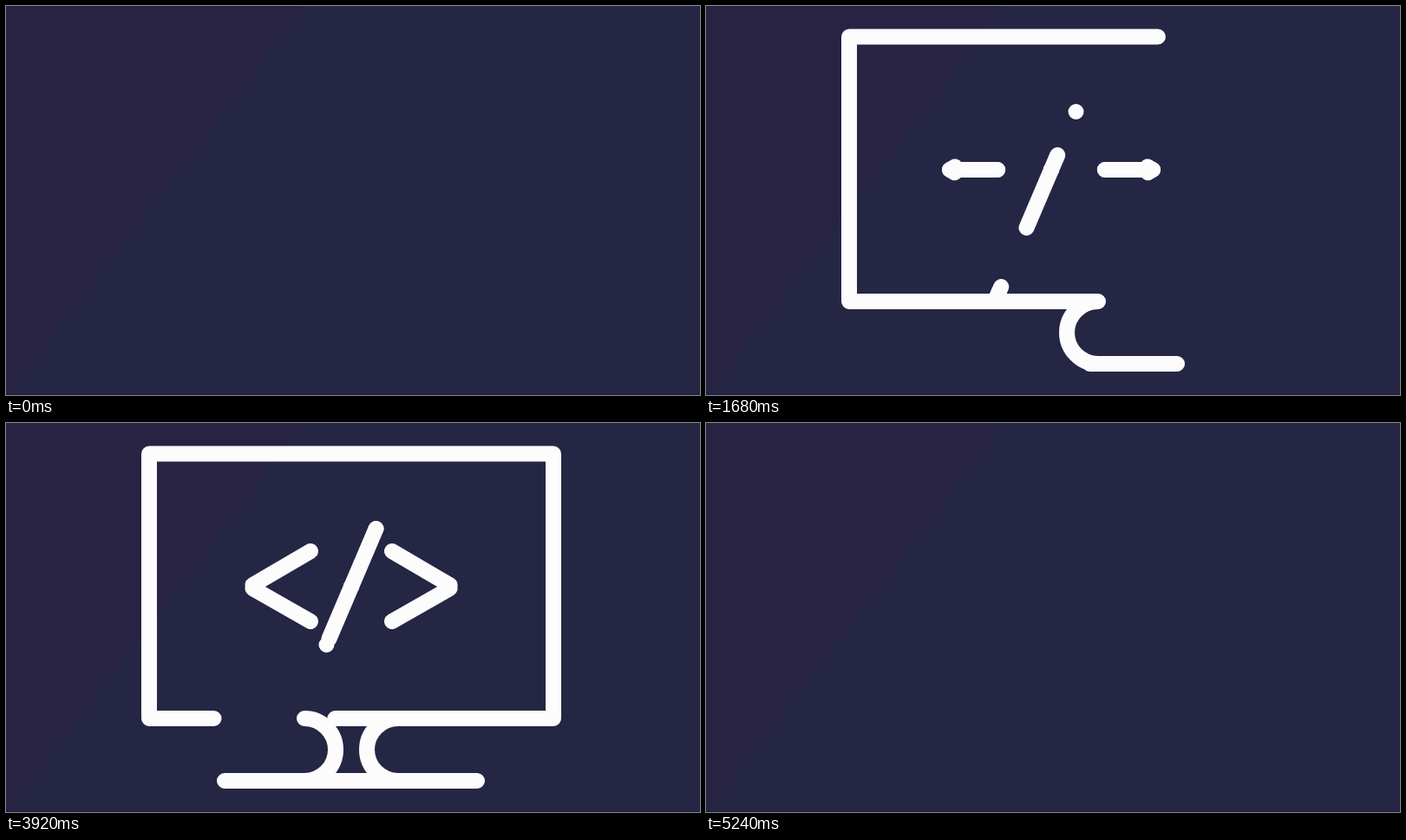
Write an HTML page that moves like this. It is 800 px wide and 449 px high and loops after 6000 ms.

```html
<!DOCTYPE html>
<html lang="en">
<head>
<meta charset="utf-8">
<style>
  html, body { margin: 0; width: 100%; height: 100%; overflow: hidden; background: #242644; }
  svg { display: block; width: 100%; height: 100%; }
  #lines { fill: none; stroke: #fcfcfc; stroke-width: 18; stroke-linecap: round; stroke-linejoin: round; }
</style>
</head>
<body>
<svg viewBox="0 0 800 449">
  <path fill="#282243" d="M0 0H342L0 449Z"/>
  <path fill="#1f1738" d="M0 448H800V449H0Z"/>
  <g id="lines"></g>
  <circle id="dot" cy="189" r="9" fill="#fcfcfc"/>
</svg>
<script>
const LOOP = 6, BURST = 1.254, MIRROR = 6.475;
const group = document.getElementById('lines');
const dot = document.getElementById('dot');
const clamp = v => Math.min(1, Math.max(0, v));

// Share of a line still undrawn: exponential ease-out
const left = t => clamp(10 ** (BURST - t) - 0.017 * Math.max(0, t - 2.4));

// How the tail leaves the lead-in part of a path
const slowTail = s => 1 - Math.exp(-2 * s ** 1.15);
const fastTail = s => 1 - Math.exp(-9.2 * s ** 1.5);
const overshoot = s => 12 * Math.sin(Math.PI * clamp((s - 0.55) / 1.2));

function line(d, lead, power, tail, extra = () => 0) {
  const el = document.createElementNS('http://www.w3.org/2000/svg', 'path');
  el.setAttribute('d', d);
  group.append(el);
  return { el, lead, power, tail, extra, length: el.getTotalLength() };
}

const bracket = (apex, tip) => [148, 229].map(y =>
  line(`M398 189H${apex}L${tip} ${y}`, 117, 1.1, slowTail));

const lines = [
  ...bracket(281, 351),
  ...bracket(515, 445),
  line('M369.5 256L426.5 122', 0, 1.1, slowTail),
  line('M398 189L333 341H165V35.5H631V341H452', 165, 1.4, fastTail, overshoot),
  line('M426.5 122L333 341H452A36 36 0 0 0 452 413H543H252H344A36 36 0 0 0 344 341',
    238, 1.2, fastTail, overshoot)
];

function draw(t) {
  const u = clamp((t - 0.04) / 1.2);
  dot.setAttribute('cx', 398 + 411 * (1 - u) ** 4);
  dot.style.display = t < BURST ? '' : 'none';

  const s = Math.max(0, t - BURST);
  for (const { el, lead, power, tail, extra, length } of lines) {
    const erased = 1 - (1 - left(MIRROR - t)) ** power;
    const end = length * (1 - left(t));
    const start = lead * tail(s) + extra(s) + (length - lead) * erased;
    const visible = s > 0 && erased < 1 && end > start;
    el.style.display = visible ? '' : 'none';
    if (visible) el.setAttribute('stroke-dasharray', `0 ${start} ${end - start} 9999`);
  }
}

function tick() {
  draw(performance.now() / 1000 % LOOP);
  requestAnimationFrame(tick);
}
tick();
</script>
</body>
</html>
```
